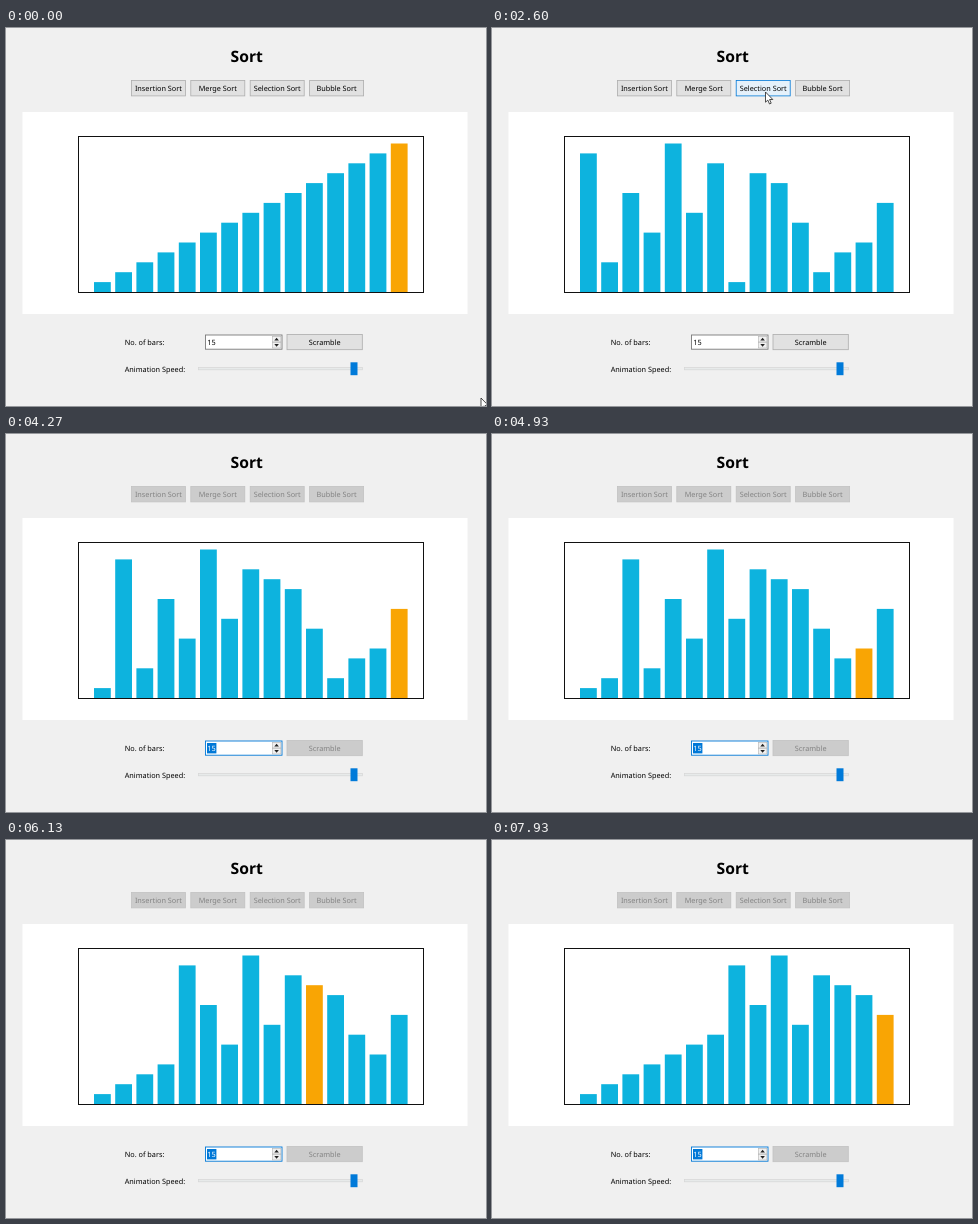
An HTML page that plays this animation: 480x378 px, repeating every 8000 ms.

```html
<!DOCTYPE html>
<html lang="en">
<head>
<meta charset="utf-8">
<title>Sort</title>
<style>
  html, body { margin: 0; width: 100%; height: 100%; overflow: hidden; background: #f0f0f0; }
  svg { display: block; width: 480px; height: 378px; }
  text { font: 7.3px "Noto Sans", "Open Sans", sans-serif; text-rendering: geometricPrecision; }
  .title { font-size: 15.7px; font-weight: 700; }
  .mid { text-anchor: middle; }
  .button rect { fill: #e1e1e1; stroke: #adadad; stroke-width: .8; }
  .button.hover rect { fill: #e5f1fb; stroke: #0078d7; }
  .busy .button rect { fill: #ccc; stroke: #c2c2c2; }
  .busy .button text { fill: #838383; }
  .field { fill: #fff; stroke: #7a7a7a; stroke-width: .9; }
  .busy .field { stroke: #0078d7; }
  .selection { fill: #0078d7; visibility: hidden; }
  .busy .selection { visibility: visible; }
  .busy .value { fill: #fff; }
  .bar { fill: #0db3de; }
  .bar.active { fill: #f9a504; }
  .busy #cursor { display: none; }
</style>
</head>
<body>
<svg id="stage" viewBox="0 0 480 378">
  <rect width="480" height="378" fill="#f0f0f0"/>
  <text class="title mid" x="240.7" y="33.6">Sort</text>
  <rect x="16.5" y="84" width="445" height="202" fill="#fff"/>
  <g id="bars"></g>
  <rect x="72.5" y="108.5" width="345" height="156" fill="none" stroke="#111"/>
  <g id="buttons"></g>

  <text x="118.7" y="317">No. of bars:</text>
  <rect class="field" x="199.5" y="307" width="76.5" height="14.2"/>
  <rect class="selection" x="201" y="309" width="9.4" height="10.4"/>
  <text class="value" x="201.3" y="317">15</text>
  <g fill="#f0f0f0" stroke="#b4b4b4" stroke-width=".6">
    <rect x="266.3" y="308.3" width="8.6" height="5.6"/>
    <rect x="266.3" y="314.4" width="8.6" height="5.6"/>
  </g>
  <path d="M268.3 312.5l2.3-2.8 2.3 2.8zM268.3 316l2.3 2.8 2.3-2.8z" fill="#222"/>

  <text x="118.7" y="344">Animation Speed:</text>
  <rect x="192.5" y="339.4" width="164" height="2.4" fill="#e7eaea" stroke="#d6d6d6" stroke-width=".7"/>
  <rect x="344.5" y="334.3" width="7" height="12.9" fill="#007ad9"/>

  <path id="cursor" d="M0 0V10.2L2.3 8.1 4 12 5.7 11.2 4.1 7.5H7.3Z" fill="#fff" stroke="#222" stroke-width=".8"/>
</svg>
<script>
  const LOOP = 8000, FRAME = 1000 / 15;
  const SCRAMBLE = 930, SORT = 2660, STEP = 57.8;
  const COUNT = 15;
  const sorted = Array.from({ length: COUNT }, (_, i) => i + 1);
  const scrambled = [14, 3, 10, 6, 15, 8, 13, 1, 12, 11, 7, 2, 4, 5, 9];
  // Pointer stops: time, x, y
  const stops = [
    [0, 475, 370], [60, 475, 370], [480, 387.5, 323.5], [867, 325, 316], [1000, 325, 316],
    [1267, 318, 298], [1740, 318, 298], [2600, 273.5, 64], [LOOP, 273.5, 64]
  ];

  const $ = id => document.getElementById(id);
  function add(parent, tag, attrs, label) {
    const el = document.createElementNS("http://www.w3.org/2000/svg", tag);
    for (const key in attrs) el.setAttribute(key, attrs[key]);
    if (label) el.textContent = label;
    return parent.appendChild(el);
  }

  function makeButton(label, x, y, width, height) {
    const el = add($("buttons"), "g", {});
    add(el, "rect", { x, y, width, height });
    add(el, "text", { class: "mid", x: x + width / 2, y: y + 10.6 }, label);
    const contains = (px, py) => px >= x && px <= x + width && py >= y && py <= y + height;
    return { el, contains };
  }

  const buttons = ["Insertion Sort", "Merge Sort", "Selection Sort", "Bubble Sort"]
    .map((label, i) => makeButton(label, 125.4 + i * 59.4, 52.5, 54, 15.4));
  buttons.push(makeButton("Scramble", 281, 306.5, 75.3, 15.2));

  const bars = sorted.map((_, i) => add($("bars"), "rect", { x: 88 + i * 21.2, width: 16.8 }));

  // Selection sort that moves each minimum to the front of the unsorted part
  function sortState(step) {
    const values = scrambled.slice();
    let start = 0;
    while (start < COUNT - 1 && step >= COUNT - start) {
      step -= COUNT - start;
      const least = values.indexOf(Math.min(...values.slice(start)));
      values.splice(start, 0, values.splice(least, 1)[0]);
      start++;
    }
    return { values, active: start + step };
  }

  function stateAt(time) {
    if (time < SCRAMBLE) return { values: sorted, active: COUNT - 1 };
    if (time < SORT) return { values: scrambled, active: -1 };
    const origin = time < 3500 ? 2600 : 2619; // short lag after the first pass
    return sortState(Math.floor((time - origin) / STEP));
  }

  function pointerAt(time) {
    const i = stops.findIndex(stop => stop[0] > time);
    const [t0, x0, y0] = stops[i - 1], [t1, x1, y1] = stops[i];
    const p = (time - t0) / (t1 - t0), k = p * p * (3 - 2 * p);
    return [x0 + (x1 - x0) * k, y0 + (y1 - y0) * k];
  }

  function draw(time) {
    const { values, active } = stateAt(time);
    bars.forEach((bar, i) => {
      const height = values[i] * 9.9;
      bar.setAttribute("y", 264 - height);
      bar.setAttribute("height", height);
      bar.setAttribute("class", i === active ? "bar active" : "bar");
    });
    const [x, y] = pointerAt(time);
    $("cursor").setAttribute("transform", `translate(${x} ${y})`);
    $("stage").setAttribute("class", time >= SORT ? "busy" : "");
    for (const { el, contains } of buttons)
      el.setAttribute("class", contains(x, y) ? "button hover" : "button");
  }

  const begin = performance.now();
  function tick() {
    const time = (performance.now() - begin) % LOOP;
    draw(Math.floor(time / FRAME + 0.1) * FRAME % LOOP);
    requestAnimationFrame(tick);
  }
  tick();
</script>
</body>
</html>
```
